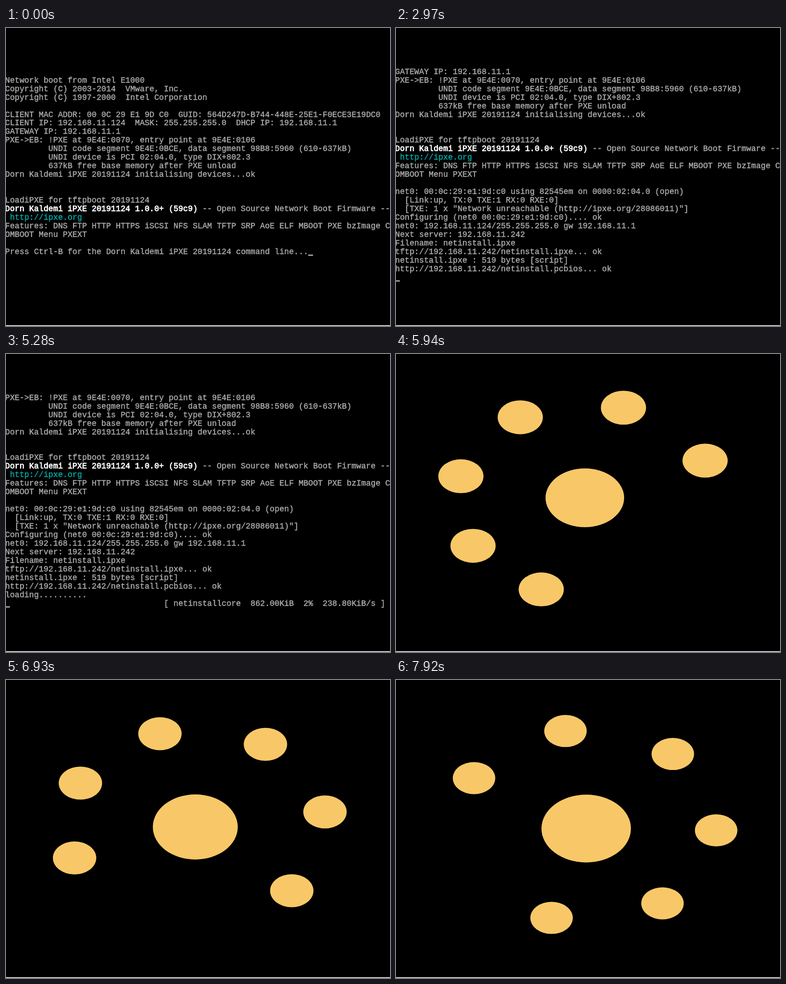
An HTML page with a canvas for the animation above (8 s loop, 850 by 659 pixels).

```html
<!DOCTYPE html>
<html lang="en">
<head>
<meta charset="utf-8">
<title>Network boot</title>
<style>
html, body { margin: 0; width: 100%; height: 100%; overflow: hidden; background: #000; }
canvas { display: block; }
</style>
</head>
<body>
<canvas id="screen" width="850" height="659"></canvas>
<script>
const ctx = document.getElementById('screen').getContext('2d');
const LOOP = 8000;
const LEFT = -2, TOP = 87.4, COL = 10.65, ROW = 18.96;
const GREY = '#aaaaaa', WHITE = '#ffffff', CYAN = '#00aaaa';
const NAME = 'Dorn Kaldemi iPXE 20191124';

// A line is a string, or a list of [text, colour, weight] runs.
const header = [
  '',
  'Network boot from Intel E1000',
  'Copyright (C) 2003-2014  VMware, Inc.',
  'Copyright (C) 1997-2000  Intel Corporation',
  '',
  'CLIENT MAC ADDR: 00 0C 29 E1 9D C0  GUID: 564D247D-B744-448E-25E1-F0ECE3E19DC0',
  'CLIENT IP: 192.168.11.124  MASK: 255.255.255.0  DHCP IP: 192.168.11.1',
  'GATEWAY IP: 192.168.11.1',
  'PXE->EB: !PXE at 9E4E:0070, entry point at 9E4E:0106',
  '         UNDI code segment 9E4E:0BCE, data segment 98B8:5960 (610-637kB)',
  '         UNDI device is PCI 02:04.0, type DIX+802.3',
  '         637kB free base memory after PXE unload',
  NAME + ' initialising devices...ok',
  '',
  '',
  'LoadiPXE for tftpboot 20191124',
  [[NAME + ' 1.0.0+ (59c9)', WHITE, 0.9], [' -- Open Source Network Boot Firmware --', GREY]],
  [[' http://ipxe.org', CYAN]],
  'Features: DNS FTP HTTP HTTPS iSCSI NFS SLAM TFTP SRP AoE ELF MBOOT PXE bzImage C',
  'OMBOOT Menu PXEXT',
  ''
];
const prompt = [...header, 'Press Ctrl-B for the ' + NAME + ' command line...'];
const opened = [
  ...header,
  'net0: 00:0c:29:e1:9d:c0 using 82545em on 0000:02:04.0 (open)',
  '  [Link:up, TX:0 TXE:1 RX:0 RXE:0]',
  '  [TXE: 1 x "Network unreachable (http://ipxe.org/28086011)"]'
];
const config = 'Configuring (net0 00:0c:29:e1:9d:c0)...';
const waiting = [...opened, config];
const waited = [...opened, config + '.'];
const fetched = [
  ...opened,
  config + '. ok',
  'net0: 192.168.11.124/255.255.255.0 gw 192.168.11.1',
  'Next server: 192.168.11.242',
  'Filename: netinstall.ipxe',
  'tftp://192.168.11.242/netinstall.ipxe... ok',
  'netinstall.ipxe : 519 bytes [script]',
  'http://192.168.11.242/netinstall.pcbios... ok'
];
const loading = [...fetched, 'loading..........'];
const status = [...loading, ' '.repeat(33) + '[ netinstallcore  862.00KiB  2%  238.80KiB/s ]'];

// Console states: start time, lines, scrolled rows, cursor [row, column].
const consoles = [
  { at: 0, lines: prompt, scroll: 0, cursor: [21, 63] },
  { at: 660, lines: prompt, scroll: 0 },
  { at: 1650, lines: waiting, scroll: 0, cursor: [24, 39] },
  { at: 1980, lines: waiting, scroll: 0 },
  { at: 2640, lines: waited, scroll: 0, cursor: [24, 40] },
  { at: 2970, lines: fetched, scroll: 7, cursor: [24, 0] },
  { at: 3300, lines: loading, scroll: 8 },
  { at: 3960, lines: loading, scroll: 8, cursor: [24, 0] },
  { at: 4620, lines: loading, scroll: 8 },
  { at: 5280, lines: status, scroll: 8, cursor: [24, 0] }
];

// Ring poses: lead angle, first gap, gap shrink, ball radii, hub centre and radii.
const rings = [
  { at: 5940, lead: 336, gap: 49.5, shrink: 2.2, ball: [50, 37.5], hub: [418, 318, 87, 65] },
  { at: 6270, lead: 350, gap: 50, shrink: 2.2, ball: [50, 37.5], hub: [418, 320, 89, 67] },
  { at: 6600, lead: 371.4, gap: 50, shrink: 1.8, ball: [49.5, 37.5], hub: [418.5, 322, 91.5, 69] },
  { at: 6930, lead: 402.8, gap: 51, shrink: 1.25, ball: [48, 36.5], hub: [419, 325, 94, 72] },
  { at: 7260, lead: 434.1, gap: 51.9, shrink: 0.7, ball: [47, 35.5], hub: [419, 328, 97, 74.5] },
  { at: 7920, lead: 465.7, gap: 51.5, shrink: 0.15, ball: [47, 35.5], hub: [421, 328.5, 99, 75] }
];

const current = (list, t) => list.filter(s => s.at <= t).pop();

function put(text, row, col, color, weight = 0.5) {
  const x = LEFT + col * COL, y = TOP + row * ROW + 14.3;
  ctx.fillStyle = ctx.strokeStyle = color;
  ctx.lineWidth = weight;
  ctx.fillText(text, x, y);
  ctx.strokeText(text, x, y);
}

function drawConsole({ lines, scroll, cursor }) {
  ctx.font = '17.75px "Liberation Mono", monospace';
  ctx.lineJoin = 'round';
  lines.slice(scroll).forEach((line, row) => {
    const runs = Array.isArray(line) ? line : [[line, GREY]];
    let col = 0;
    for (const [text, color, weight] of runs) {
      put(text, row, col, color, weight);
      col += text.length;
    }
  });
  if (cursor) {
    const [row, col] = cursor;
    ctx.fillStyle = GREY;
    ctx.fillRect(LEFT + col * COL, TOP + row * ROW + 15.5, COL, 2.8);
  }
}

function oval(x, y, rx, ry) {
  ctx.beginPath();
  ctx.ellipse(x, y, rx, ry, 0, 0, Math.PI * 2);
  ctx.fill();
}

function drawRing({ lead, gap, shrink, ball, hub }) {
  ctx.fillStyle = '#f8c868';
  oval(...hub);
  for (let i = 0; i < 6; i++) {
    const deg = lead - gap * i + shrink * i * (i - 1) / 2;
    const a = deg * Math.PI / 180;
    oval(422 + 287 * Math.cos(a), 322 + 212 * Math.sin(a), ...ball);
  }
}

function draw(t) {
  ctx.fillStyle = '#000';
  ctx.fillRect(0, 0, 850, 659);
  const ring = current(rings, t);
  if (ring) drawRing(ring);
  else drawConsole(current(consoles, t));
  ctx.fillStyle = '#eeeeee';
  ctx.fillRect(0, 657.3, 850, 1.7);
}

const start = performance.now();
function tick() {
  draw((performance.now() - start) % LOOP);
  requestAnimationFrame(tick);
}
tick();
</script>
</body>
</html>
```
